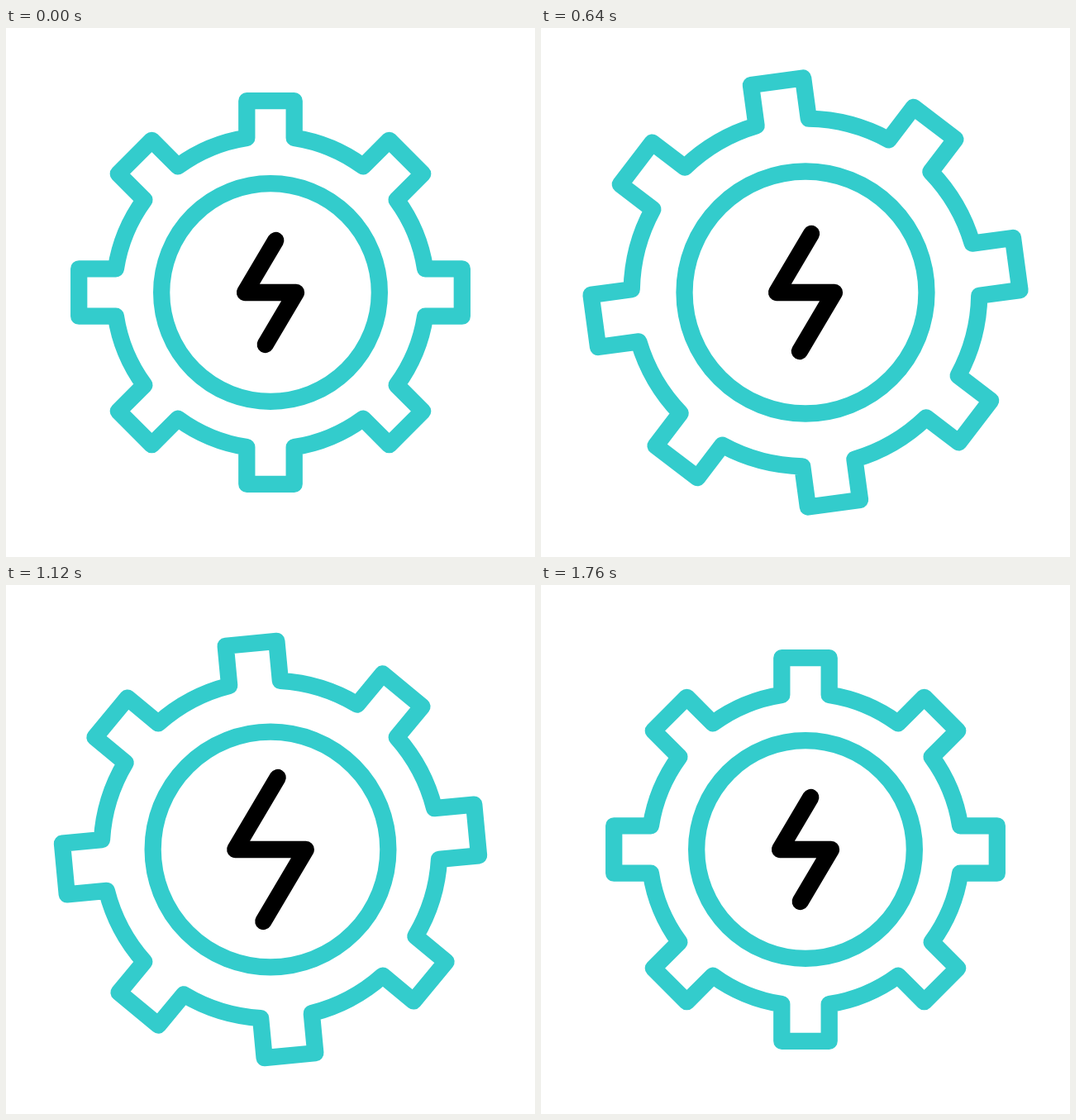
An HTML page with a canvas for the animation above (1840 ms loop, 640 by 640 pixels).

```html
<!DOCTYPE html>
<html lang="en">
<head>
<meta charset="utf-8">
<title>Gear and bolt</title>
<style>
  html, body { margin: 0; width: 100%; height: 100%; overflow: hidden; background: #fff; }
  canvas { display: block; width: 640px; height: 640px; }
</style>
</head>
<body>
<canvas id="stage" width="640" height="640"></canvas>
<script>
const ctx = document.getElementById('stage').getContext('2d');
const LOOP = 1840, STEP = 40, LEAD = 80, STEPS = 42;
const TEETH = 8, ROOT = 189.3, TIP = 231.8, HALF = 28.7, RING = 131.85;
const PULL = 0.49;

// cubic-bezier(PULL, 0, 1 - PULL, 1), clamped to 0..1
function ease(x) {
  if (x <= 0) return 0;
  if (x >= 1) return 1;
  let lo = 0, hi = 1;
  for (let i = 0; i < 24; i++) {
    const u = (lo + hi) / 2, v = 1 - u;
    if (3 * u * v * (PULL * v + (1 - PULL) * u) + u ** 3 < x) lo = u; else hi = u;
  }
  return lo * lo * (3 - 2 * lo);
}

// Rises from 1 to 1 + amount at peak, then falls back
function pulse(step, start, peak, end, amount) {
  const rise = step < peak ? (step - start) / (peak - start) : (end - step) / (end - peak);
  return 1 + amount * ease(rise);
}

function drawGear(scale, turn) {
  const gap = Math.asin(HALF / ROOT), side = Math.atan(HALF / TIP);
  const tip = Math.hypot(HALF, TIP);
  ctx.strokeStyle = '#33cccc';
  ctx.beginPath();
  for (let i = 0; i < TEETH; i++) {
    const a = turn - Math.PI / 2 + i * 2 * Math.PI / TEETH;
    for (const b of [a - side, a + side]) {
      ctx.lineTo(scale * tip * Math.cos(b), scale * tip * Math.sin(b));
    }
    ctx.arc(0, 0, scale * ROOT, a + gap, a + 2 * Math.PI / TEETH - gap);
  }
  ctx.closePath();
  ctx.stroke();
  ctx.beginPath();
  ctx.arc(0, 0, scale * RING, 0, 2 * Math.PI);
  ctx.stroke();
}

function drawBolt(scale) {
  ctx.strokeStyle = '#000';
  ctx.beginPath();
  for (const [x, y] of [[6.3, -63], [-31, 0], [31, 0], [-6.3, 63]]) {
    ctx.lineTo(x * scale, y * scale);
  }
  ctx.stroke();
}

function draw() {
  const time = performance.now() % LOOP;
  const step = Math.max(0, Math.floor((time - LEAD) / STEP));
  ctx.setTransform(1, 0, 0, 1, 0, 0);
  ctx.fillStyle = '#fff';
  ctx.fillRect(0, 0, 640, 640);
  ctx.translate(320, 320);
  ctx.lineWidth = 20.3;
  ctx.lineCap = ctx.lineJoin = 'round';
  drawGear(pulse(step, 3.4, 19.2, 33.9, 0.139), Math.PI * ease(step / STEPS));
  drawBolt(pulse(step, 7.8, 23.2, 37.8, 0.405));
  requestAnimationFrame(draw);
}
draw();
</script>
</body>
</html>
```
